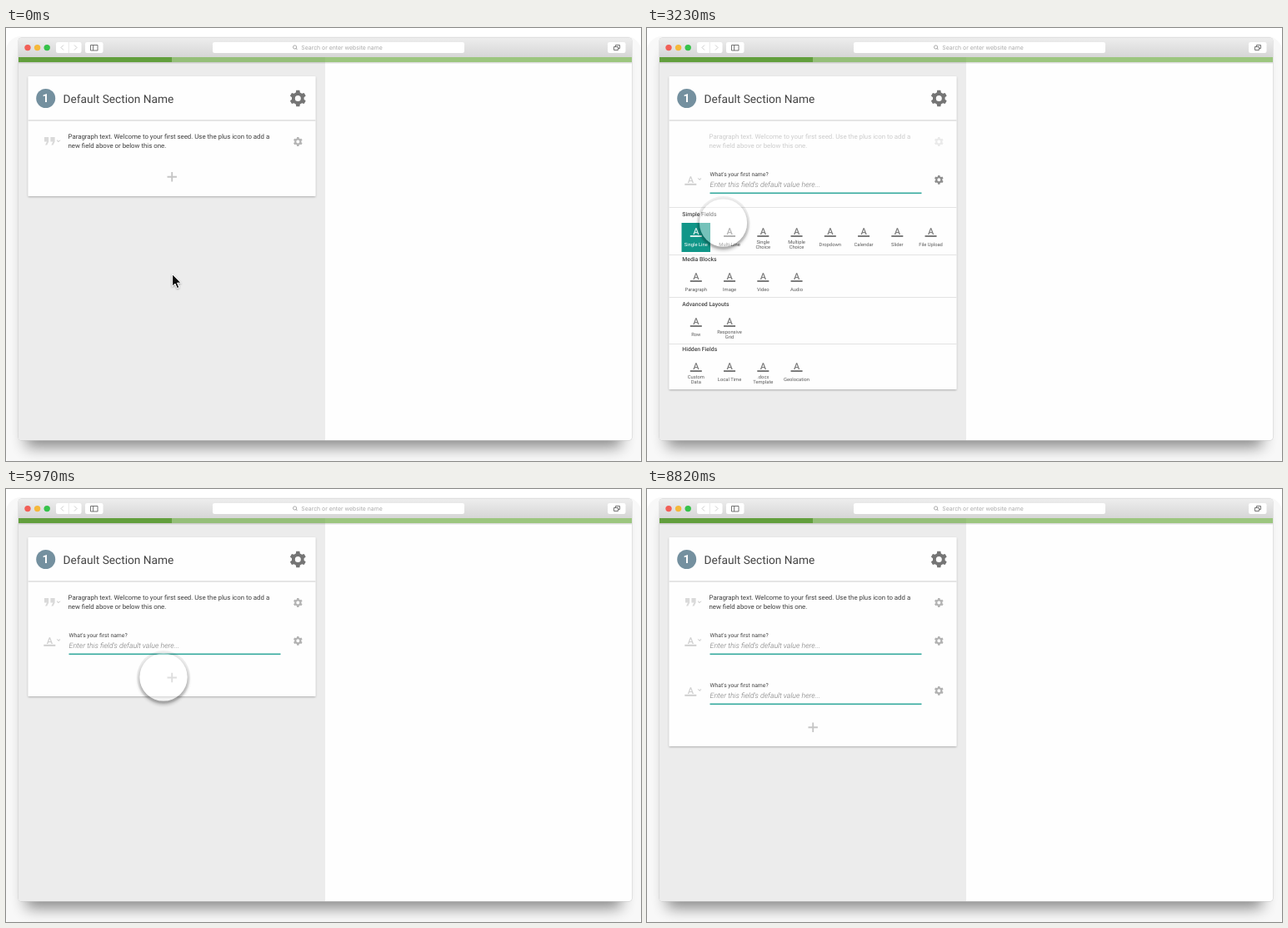
These frames come from a looping animation (762 px wide and 520 px high, 9.82 s). An HTML page:

```html
<!DOCTYPE html>
<html lang="en">
<head>
<meta charset="utf-8">
<title>Form builder</title>
<style>
  html, body { margin: 0; width: 100%; height: 100%; overflow: hidden; background: #fff; }
  svg { display: block; width: 762px; height: 520px; }
  text { font-family: Roboto, sans-serif; text-rendering: geometricPrecision; }
</style>
</head>
<body>
<svg id="stage" viewBox="0 0 762 520" xmlns="http://www.w3.org/2000/svg"></svg>
<script>
const LOOP = 9820;
const stage = document.getElementById('stage');

// --- drawing helpers ---
const rect = (x, y, w, h, fill, more = '') =>
  `<rect x="${x}" y="${y}" width="${w}" height="${h}" fill="${fill}" ${more}/>`;
const text = (x, y, size, fill, str, more = '') =>
  `<text x="${x}" y="${y}" font-size="${size}" fill="${fill}" ${more}>${str}</text>`;
const line = (d, color, width, more = '') =>
  `<path d="${d}" fill="none" stroke="${color}" stroke-width="${width}" ${more}/>`;
const disc = (x, y, r, fill, more = '') =>
  `<circle cx="${x}" cy="${y}" r="${r}" fill="${fill}" ${more}/>`;

function gear(x, y, scale, fill, id = '') {
  const pts = [];
  for (let k = 0; k < 6; k++) {
    for (const [r, off] of [[7.4, -20], [9.9, -12], [9.9, 12], [7.4, 20]]) {
      const a = (k * 60 - 90 + off) * Math.PI / 180;
      pts.push((r * Math.cos(a)).toFixed(2) + ' ' + (r * Math.sin(a)).toFixed(2));
    }
  }
  return `<path ${id} transform="translate(${x} ${y}) scale(${scale})" fill="${fill}" fill-rule="evenodd"
    d="M${pts.join('L')}ZM3.5 0A3.5 3.5 0 1 0 -3.5 0A3.5 3.5 0 1 0 3.5 0Z"/>`;
}

const letterIcon = (x, y, fill) =>
  text(x, y - 2, 11, fill, 'A', 'text-anchor="middle" font-weight="500"') + rect(x - 7, y - 1, 14, 2, fill);
const chevron = (x, y) => line(`M${x - 1.8} ${y - 1}l1.8 1.8l1.8 -1.8`, '#bbb', 1);

// --- window ---
function chrome() {
  const lights = ['#f25f57', '#f5b83a', '#36c24a'].map((c, i) => disc(26 + 11.6 * i, 23.6, 3.7, c)).join('');
  const button = (x, w) => rect(x, 17, w, 13, '#fff', 'rx="2.2"');
  return rect(15, 12, 736, 24, 'url(#bar)') + lights +
    button(60, 30.5) + line('M75.3 17v13', '#e4e4e4', .8) +
    line('M69 20.5l-3 3l3 3M82 20.5l3 3l-3 3', '#c4c4c4', .9) +
    button(95, 21.5) + line('M101.5 20.5h8.5v6.5h-8.5zM104.6 20.5v6.5', '#666', .9) +
    button(248, 302) + line('M349.5 26l-2 -2', '#999', .9) +
    `<circle cx="346.6" cy="23" r="2.1" fill="none" stroke="#999" stroke-width=".8"/>` +
    text(354.3, 26.3, 6.9, '#a9a9a9', 'Search or enter website name', 'style="font-family:Inter,sans-serif"') +
    button(722, 21.5) + line('M729.5 22.5h5v4h-5zM731.5 22.5v-2h5v4h-2', '#666', .9);
}

const greens = () => rect(15, 35, 736, 6, '#9cc67f') + rect(199, 35, 184, 6, '#95bf79') +
  rect(15, 35, 184, 6, '#629f3d') + rect(15, 41, 736, 2.5, 'url(#under)');

// --- form rows ---
const paragraph = () => {
  const quote = x => `M${x} 136.5h3l-2 4h2.2l2 -4v-5.5h-5.2z`;
  return `<g id="para">` +
    text(74.5, 132.6, 7.85, '#3c3c3c', 'Paragraph text. Welcome to your first seed. Use the plus icon to add a') +
    text(74.5, 143.9, 7.85, '#3c3c3c', 'new field above or below this one.') +
    gear(350.3, 136.5, .56, '#b4b4b4') + `</g><g id="paraIcon">` +
    `<path d="${quote(46)}${quote(53.4)}" fill="#dadada"/>` + chevron(63, 135.8) + `</g>`;
};

const field = (n, y) => `<g id="field${n}"><g id="body${n}">` +
  text(75.6, y - 4.8, 6.78, '#444', 'What\'s your first name?') +
  text(75.6, y + 8.8, 8.75, '#777', 'Enter this field\'s default value here...', 'font-style="italic" font-weight="300"') +
  rect(75.5, y + 15.2, 254, 1.6, '#35aa9e') +
  gear(350.3, y, .56, '#8e8e8e', `id="gear${n}"`) + `</g><g id="icon${n}">` +
  letterIcon(52.3, y + 5.5, '#cfcfcf') + chevron(63.2, y - .8) + `</g></g>`;

// --- field menu, drawn around its own middle ---
const groups = [
  ['Simple Fields', 215, 'Single Line,Multi-Line,Single|Choice,Multiple|Choice,Dropdown,Calendar,Slider,File Upload'],
  ['Media Blocks', 272, 'Paragraph,Image,Video,Audio'],
  ['Advanced Layouts', 323, 'Row,Responsive|Grid'],
  ['Hidden Fields', 379, 'Custom|Data,Local Time,.docx|Template,Geolocation']
];
const MID = 325;

function menu() {
  return groups.map(([title, top, names], g) => {
    const y = 224 + 54 * g - MID;
    const items = names.split(',').map((name, i) => {
      const x = 58.8 + 40.25 * i, on = !g && !i, words = name.split('|');
      const first = y + 38 - (words.length - 1) * 3.1;
      return (on ? rect(41.5, y + 10, 34.5, 35, '#119688') : '') +
        letterIcon(x, y + 26, on ? '#d9efec' : '#7c7c7c') +
        words.map((w, k) => text(x, first + 6.4 * k, 5.8, on ? '#fff' : '#5c5c5c', w, 'text-anchor="middle"')).join('');
    }).join('');
    return rect(26.5, top - MID, 345, 1, '#e3e3e3') +
      text(42.3, y + 2.4, 6.85, '#444', title, 'font-weight="500"') + items;
  }).join('');
}

// --- pointers ---
const arrow = `<g id="arrow"><path d="M0 0V14.6L3.4 11.5L5.7 17L8.2 15.9L5.9 10.6H10.4Z"
  fill="#111" stroke="#fff" stroke-width="1" filter="url(#soft)"/></g>`;
const touch = `<g id="touch"><g mask="url(#rim)">` +
  disc(0, 3, 29.5, '#000', 'opacity=".3" filter="url(#blur)"') + disc(0, 0, 32, '#000', 'opacity=".06"') +
  `</g>` + disc(0, 0, 28.6, '#fff', 'opacity=".42"') + `</g>`;

stage.innerHTML = `<defs>
  <linearGradient id="bar" x2="0" y2="1"><stop stop-color="#ededed"/><stop offset="1" stop-color="#d5d5d5"/></linearGradient>
  <linearGradient id="under" x2="0" y2="1"><stop stop-opacity=".16"/><stop offset="1" stop-opacity="0"/></linearGradient>
  <filter id="shade" x="-10%" y="-10%" width="120%" height="120%"><feGaussianBlur stdDeviation="9"/></filter>
  <filter id="blur" x="-30%" y="-30%" width="160%" height="160%"><feGaussianBlur stdDeviation="2.2"/></filter>
  <filter id="soft" x="-50%" y="-50%" width="200%" height="200%"><feDropShadow dx="0" dy="1" stdDeviation="1" flood-opacity=".35"/></filter>
  <filter id="edge" filterUnits="userSpaceOnUse" x="15" y="45" width="380" height="480"><feDropShadow dx="0" dy="1" stdDeviation=".9" flood-opacity=".27"/></filter>
  <clipPath id="win"><rect x="15" y="12" width="736" height="483" rx="3.5"/></clipPath>
  <mask id="rim" maskUnits="userSpaceOnUse" x="-45" y="-45" width="90" height="90">
    ${rect(-45, -45, 90, 90, '#fff')}${disc(0, 0, 28.6, '#000')}</mask>
</defs>` +
  rect(0, 10, 762, 520, '#f8f8f8', 'rx="18"') +
  rect(24, 32, 714, 471, '#000', 'opacity=".46" filter="url(#shade)"') +
  rect(14.6, 11.6, 736.8, 483.8, '#c9c9c9', 'rx="4"') +
  `<g clip-path="url(#win)">` +
  rect(15, 12, 736, 483, '#fefefe') + rect(15, 41, 368, 454, '#ececec') + chrome() + greens() +
  rect(26.5, 58, 345, 144, '#fefefe', 'id="card" rx="1" filter="url(#edge)"') +
  disc(47.7, 84.5, 11.5, '#74909f') +
  text(47.5, 89.4, 14, '#fff', '1', 'text-anchor="middle" font-weight="700"') +
  text(68.5, 89.7, 13.7, '#444', 'Default Section Name') + gear(350.3, 84.5, 1, '#757575') +
  rect(26.5, 110.3, 345, 1.4, '#dcdcdc') +
  paragraph() + field(1, 182.3) + field(2, 242.3) +
  `<g id="menu">${menu()}</g>` +
  `<path id="plus" d="M-5.7 0H5.7M0 -5.7V5.7" stroke="#c6c6c6" stroke-width="1.9"/>` +
  arrow + touch + `</g>`;

const el = {};
stage.querySelectorAll('[id]').forEach(e => el[e.id] = e);

// --- motion ---
const clamp = v => Math.min(1, Math.max(0, v));
const mix = (a, b, p) => a + (b - a) * p;
const ramp = (t, start, dur) => clamp((t - start) / dur);
const smooth = (t, start, dur) => { const p = ramp(t, start, dur); return p * p * (3 - 2 * p); };
const glide = p => { const q = Math.pow(p, .62); return q * q * (3 - 2 * q); };
const fade = (e, v) => e.setAttribute('opacity', v.toFixed(3));
const place = (e, x, y, more = '') => e.setAttribute('transform', `translate(${x.toFixed(2)} ${y.toFixed(2)})${more}`);

const START = [200, 296];
const moves = [
  [1070, 1830, 195.3, 179.7],
  [2830, 3580, 58, 251.5],
  [4620, 5130, 189, 226],
  [6530, 7130, 139, 311.7]
];

// opening time and length, closing time, lower edge before, open and after, closing delay and length
const rounds = [
  { open: 2010, len: 270, close: 3880, edge: [202, 434, 249], wait: 20, shrink: 240 },
  { open: 5970, len: 270, close: 7420, edge: [249, 500, 309], wait: 110, shrink: 150 }
];

function draw(t) {
  const second = t >= rounds[1].open;
  const r = rounds[second ? 1 : 0];
  const shown = smooth(t, r.open, r.len);
  const back = smooth(t, r.close, 220);
  const active = shown * (1 - back);
  const closing = t >= r.close;

  const bottom = closing
    ? mix(r.edge[1], r.edge[2], smooth(t, r.close + r.wait, r.shrink))
    : mix(r.edge[0], r.edge[1], shown);
  el.card.setAttribute('height', (bottom - 58).toFixed(2));

  const dim = 1 - .74 * active;
  fade(el.para, dim);
  fade(el.paraIcon, 1 - active);
  fade(el.field1, second ? 1 : shown);
  fade(el.body1, second ? dim : 1);
  fade(el.icon1, second ? 1 - active : 1);
  fade(el.gear1, second ? .68 : mix(.68, 1, active));
  fade(el.field2, second ? shown : 0);
  fade(el.gear2, mix(.68, 1, active));

  const scale = shown * (1 - smooth(t, r.close + 40, 125));
  place(el.menu, 0, MID + (second ? 60 : 0), ` scale(1 ${Math.max(scale, .001).toFixed(4)})`);
  el.menu.setAttribute('visibility', scale > .01 ? 'visible' : 'hidden');

  const plusY = closing ? (second ? 286.2 : 226.5) : (second ? 226.5 : 178.8);
  place(el.plus, 199.2, plusY);
  fade(el.plus, closing ? ramp(t, r.close, 90) : 1 - ramp(t, r.open, 120));

  const gone = ramp(t, 600, 180);
  place(el.arrow, 199.6 - 6 * gone, 295.6 - 9 * gone);
  fade(el.arrow, 1 - gone);

  let [x, y] = START;
  for (const [from, to, tx, ty] of moves) {
    const p = glide(ramp(t, from, to - from));
    x = mix(x, tx, p);
    y = mix(y, ty, p);
  }
  place(el.touch, x, y);
  fade(el.touch, ramp(t, 1070, 160) * (1 - ramp(t, 8520, 300)));
}

const begin = performance.now();
function tick() {
  draw((performance.now() - begin) % LOOP);
  requestAnimationFrame(tick);
}
tick();
</script>
</body>
</html>
```
